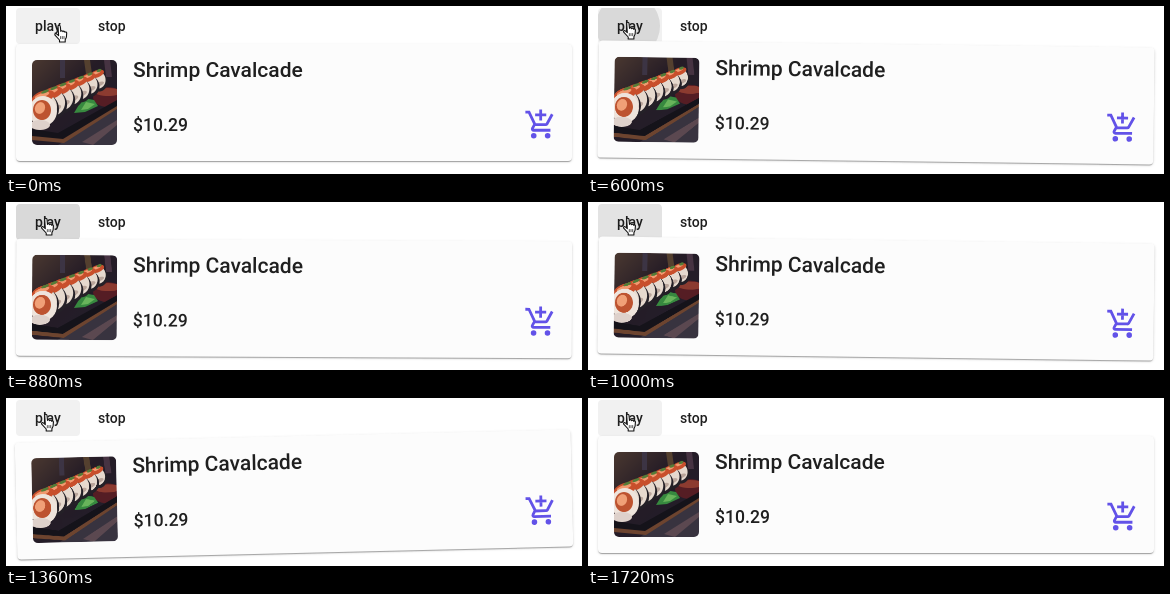
Animation of 576x168 px, one loop 1760 ms. Source, as an HTML page with a canvas:

```html
<!DOCTYPE html>
<html lang="en">
<head>
<meta charset="utf-8">
<title>Card shake</title>
<style>
  html, body { margin: 0; width: 100%; height: 100%; overflow: hidden; background: #fff; }
  body { position: relative; font-family: Roboto, Arial, sans-serif; font-weight: 500; color: #1f1f1f; }
  .btn, .card, .card > *, #hand { position: absolute; }
  .btn { top: 2px; height: 36px; line-height: 36px; font-size: 14px; white-space: nowrap; }
  #play { left: 10px; width: 64px; text-align: center; background: #f1f1f1; border-radius: 4px; overflow: hidden; }
  #stop { left: 92px; }
  #ripple { position: absolute; left: 30px; top: 18px; width: 0; height: 0; border-radius: 50%; background: #000; }
  .card {
    left: 10px; top: 38px; width: 556px; height: 117px; border-radius: 4px; background: #fcfcfc;
    box-shadow: 0 2px 1px -1px rgba(0,0,0,.2), 0 1px 1px rgba(0,0,0,.14), 0 1px 3px rgba(0,0,0,.12);
  }
  #photo { left: 16px; top: 16px; width: 85px; height: 85px; border-radius: 5px; }
  .title { left: 117px; top: 12px; line-height: 28px; font-size: 21px; white-space: nowrap; }
  .price { left: 117px; top: 69px; line-height: 24px; font-size: 17.6px; }
  .cart { left: 507.6px; top: 64px; width: 33.4px; height: 33.4px; }
  #hand { left: 0; top: 0; width: 14px; height: 18px; overflow: visible; }
</style>
</head>
<body>
<div class="btn" id="play"><span>play</span><i id="ripple"></i></div>
<div class="btn" id="stop">stop</div>

<div class="card" id="card">
  <canvas id="photo" width="170" height="170"></canvas>
  <div class="title">Shrimp Cavalcade</div>
  <div class="price">$10.29</div>
  <svg class="cart" viewBox="0 0 24 24" fill="none" stroke="#6252e8" stroke-width="2">
    <path d="M12 1v8M8 5h8M1 3h2.6l4.3 9h7.6c.5 0 .8-.2 1-.5l3.8-7M7.5 12l-1.4 2.6c-.4.7.1 1.4.9 1.4h12"/>
    <g fill="#6252e8" stroke="none"><circle cx="7" cy="20" r="2"/><circle cx="17" cy="20" r="2"/></g>
  </svg>
</div>

<svg id="hand" viewBox="0 0 14 18">
  <path fill="#fff" stroke="#111" stroke-width="1.1" stroke-linejoin="round"
    d="M4 1.8c0-1.6 2.2-1.6 2.3 0l.5 5c.3-1 1.9-1 2.1.3.5-.9 1.9-.6 2 .6.5-.7 1.8-.3 1.8.8l-.3 4-1.2 2.7v2.2H5.5v-2L1 10.5c-.7-1.2.8-2.1 1.9-1L4.6 11z"/>
  <path fill="none" stroke="#111" stroke-width=".7" d="M6.6 11.5v3M8.3 11.5v3M10 11.5v3"/>
</svg>

<script>
const $ = id => document.getElementById(id);
const card = $('card'), ripple = $('ripple'), hand = $('hand');
const LOOP = 1760;
const clamp = x => Math.max(0, Math.min(1, x));
const ramp = (t, a, b) => clamp((t - a) / (b - a));
const smooth = x => (1 - Math.cos(Math.PI * x)) / 2;

function drawPhoto() {
  const g = $('photo').getContext('2d');
  g.scale(2, 2);
  const poly = (color, ...p) => {
    g.fillStyle = color;
    g.beginPath();
    for (let i = 0; i < p.length; i += 2) g.lineTo(p[i], p[i + 1]);
    g.fill();
  };
  const oval = (color, x, y, rx, ry, turn = 0) => {
    g.fillStyle = color;
    g.beginPath();
    g.ellipse(x, y, rx, ry, turn, 0, 7);
    g.fill();
  };

  const back = g.createLinearGradient(0, 0, 85, 85);
  back.addColorStop(0, '#4a3830');
  back.addColorStop(.4, '#251c26');
  back.addColorStop(1, '#211e2c');
  g.fillStyle = back;
  g.fillRect(0, 0, 85, 85);
  poly('#3c3444', 28, 0, 33, 0, 33, 18, 28, 18);
  poly('#54402f', 52, 0, 58, 0, 60, 14, 54, 14);
  poly('#463342', 72, 0, 78, 0, 80, 17, 74, 17);

  // table, bowl and board
  poly('#38333f', 26, 85, 85, 49, 85, 85);
  poly('#5b4850', 50, 82, 85, 60, 85, 65, 61, 85);
  oval('#551d24', 76, 37, 15, 10);
  oval('#8c3b30', 76, 32, 13, 4);
  poly('#15131a', 0, 69, 26, 73, 85, 40, 85, 47, 32, 81, 0, 78);
  poly('#6d442f', 0, 76, 31, 79, 85, 46, 85, 49, 32, 83, 0, 80);
  poly('#37893f', 42, 53, 51, 38, 62, 40, 66, 46, 53, 52);
  poly('#68b45b', 49, 50, 54, 42, 63, 44, 56, 49);

  // row of rolls, far to near
  for (let i = 6; i >= 0; i--) {
    const x = 12 + i * 9, y = 47 - i * 4.5, r = 14 - i * .9;
    oval('#242027', x + 1, y + 2, r, r + 1);
    oval('#e6d9ce', x, y, r - 1, r);
    oval('#c84f2c', x - 1, y - r * .72, r * .85, r * .42, -.35);
    oval('#f19a70', x - 2, y - r * .83, r * .55, r * .16, -.35);
    oval('#b9a59b', x + 2, y + r * .45, r * .5, r * .22, -.4);
    oval('#557c37', x + 1, y - r * 1.1, r * .3, 1.4, -.4);
  }
  oval('#eee4dc', 11, 51, 14, 15);
  oval('#bd5330', 10, 50, 9, 10);
  oval('#f0a077', 8, 48, 5, 6, .4);
  oval('#ded1cb', 8, 65, 10, 5);
}

// The card swings up slower than it swings back.
function tilt(t) {
  if (t < 473 || t >= 1555) return 0;
  const rise = 193, period = 300, top = 1.45;
  const u = (t - 473) % period;
  const k = u < rise ? smooth(u / rise) : 1 - smooth((u - rise) / (period - rise));
  return top * (2 * k - 1);
}

function draw(t) {
  card.style.transform = `rotate(${tilt(t)}deg)`;

  const grow = 1 - (1 - ramp(t, 478, 703)) ** 2.6;
  const r = 37 * grow;
  const fade = 1 - ramp(t, 920, 1120);
  ripple.style.cssText =
    `width:${2 * r}px;height:${2 * r}px;margin:${-r}px 0 0 ${-r}px;opacity:${.1 * fade}`;

  const m = smooth(ramp(t, 90, 285));
  hand.style.transform = `translate(${48 - 13.3 * m}px, ${18.6 - 3 * m}px)`;
}

drawPhoto();
const start = performance.now();
function tick() {
  draw((performance.now() - start) % LOOP);
  requestAnimationFrame(tick);
}
tick();
</script>
</body>
</html>
```
